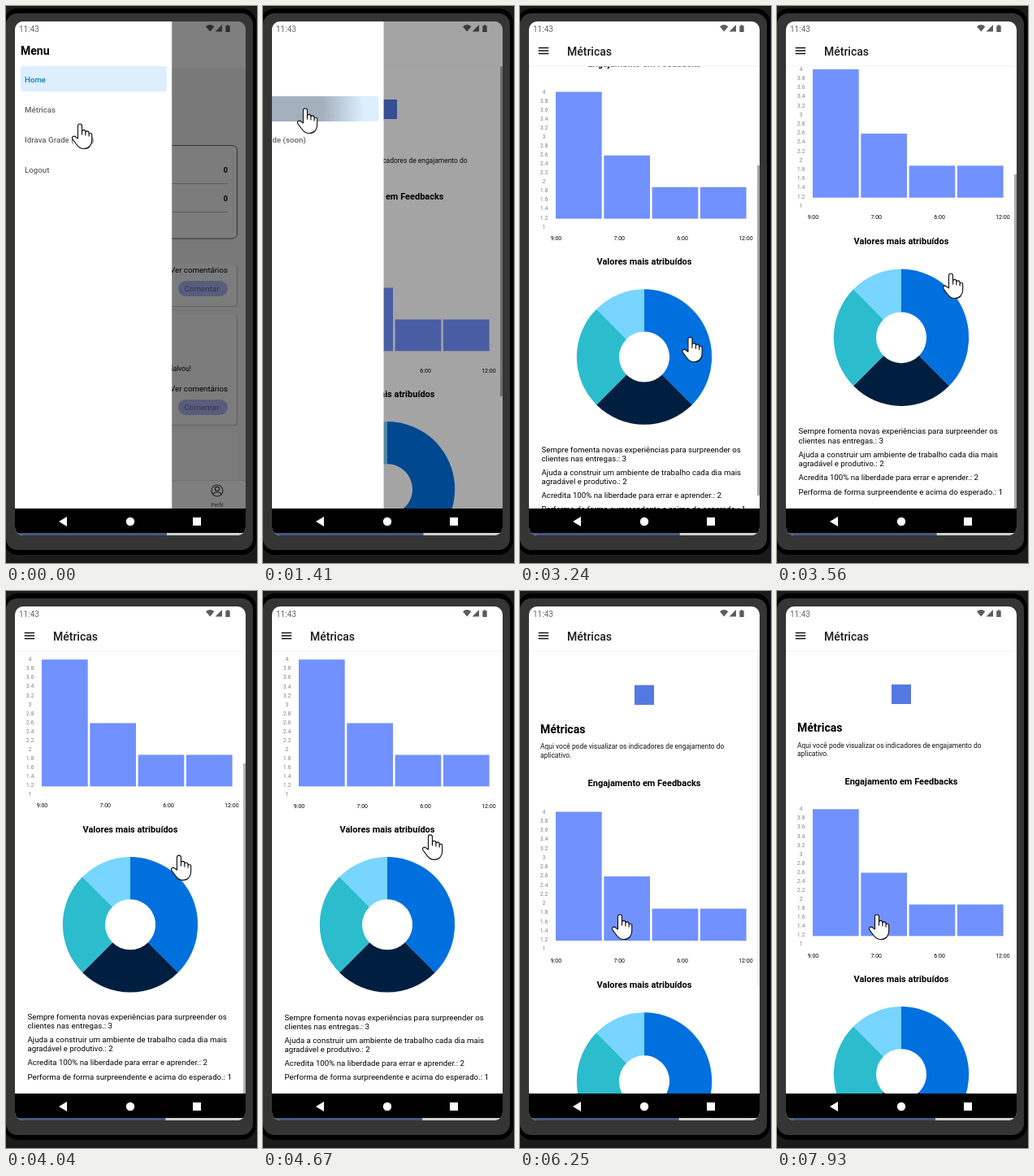
These frames come from a looping animation (309 px wide and 685 px high, 8000 ms). An HTML page:

```html
<!DOCTYPE html>
<html lang="pt">
<meta charset="utf-8">
<title>Métricas</title>
<style>
  html, body { margin: 0; width: 100%; height: 100%; overflow: hidden; background: #1b1b1b; }
  svg { display: block; font-family: Roboto, sans-serif; }
  .mid { text-anchor: middle; }
  .end { text-anchor: end; }
  .bold { font-weight: 700; }
  .item { font-weight: 500; font-size: 9.7px; fill: #666; }
  .list { font-size: 9.7px; }
  .axis { font-size: 7px; text-anchor: middle; }
</style>
<svg width="309" height="685" viewBox="0 0 309 685">
  <defs>
    <clipPath id="screenClip"><rect x="11" y="19" width="284" height="632" rx="10"/></clipPath>
    <clipPath id="pageClip"><rect x="11" y="74" width="285" height="544"/></clipPath>
    <radialGradient id="ripple" gradientUnits="userSpaceOnUse" cx="52" cy="127" r="1">
      <stop offset=".6" stop-opacity=".26"/><stop offset="1" stop-opacity="0"/>
    </radialGradient>
  </defs>

  <rect x="-3" y="3" width="311" height="672" rx="18"/>
  <rect x="0" y="9" width="304" height="660" rx="14" fill="#353535"/>

  <g clip-path="url(#screenClip)">
    <rect x="11" y="19" width="285" height="632" fill="#fff"/>

    <g id="home">
      <rect x="11" y="76" width="285" height="542" fill="#f4f4f4"/>
      <rect x="24" y="171.500" width="260.500" height="114.500" rx="6" fill="#fafafa" stroke="#444" stroke-width=".8"/>
      <path d="M36 218.500H273M36 253.500H273" stroke="#bbb"/>
      <g class="bold end" font-size="9"><text x="273" y="204.500">0</text><text x="273" y="239.500">0</text></g>
      <g id="posts"></g>
      <text class="end" x="228" y="449" font-size="8.450">Salvou!</text>
      <rect x="22" y="525" width="263" height="70" rx="4" fill="#fafafa"/>
      <rect x="11" y="583.500" width="285" height="35" fill="#fff" stroke="#ddd" stroke-width=".7"/>
      <g fill="none" stroke="#444" stroke-width="1.200">
        <circle cx="260" cy="596" r="7"/><circle cx="260" cy="594" r="2.600"/><path d="M255 601c1-4 9-4 10 0"/>
      </g>
      <text class="mid" x="260" y="615.500" font-size="6.700" fill="#555">Perfil</text>
    </g>

    <g id="metrics">
      <g clip-path="url(#pageClip)">
        <g id="stretch">
          <g id="scroller">
            <rect x="141" y="115" width="24" height="24" fill="#5479e2"/>
            <text class="bold" x="25" y="173" font-size="14">Métricas</text>
            <g font-size="8.450" fill="#111">
              <text x="25" y="192.500">Aqui você pode visualizar os indicadores de engajamento do</text>
              <text x="25" y="202.500">aplicativo.</text>
            </g>
            <g class="bold mid" font-size="11">
              <text x="153" y="237.500">Engajamento em Feedbacks</text>
              <text x="153" y="481">Valores mais atribuídos</text>
            </g>
            <g id="chart"></g>
            <g id="donut"></g>
            <g class="list" id="list"></g>
          </g>
          <rect id="bar" x="292" y="74" width="3.500" height="406" fill="#aaa"/>
        </g>
      </g>
      <rect x="11" y="73.500" width="285" height="1" fill="#f2f2f2"/>
      <path d="M22.700 51.500h12.500M22.700 55h12.500M22.700 58.500h12.500" stroke="#111" stroke-width="1.300"/>
      <text x="58" y="60.500" font-size="14" font-weight="500" fill="#1c1c1e">Métricas</text>
    </g>

    <path fill="#5c5c5c" d="M246 25.200Q251.200 20.800 256.400 25.200L251.200 31.500ZM257.500 31.500H266V23ZM270.300 24.200h1.700v-1h2v1h1.700v7.800h-5.400z"/>
    <rect id="shade" x="11" y="19" width="285" height="599"/>

    <g id="drawer">
      <rect x="11" y="19" width="193.200" height="599" fill="#fff"/>
      <text class="bold" x="18" y="60" font-size="14">Menu</text>
      <rect id="active" x="18" width="180" height="31" rx="2.500" fill="#dceeff"/>
      <rect id="press" x="18" y="111" width="180" height="31" rx="2.500" fill="url(#ripple)"/>
      <g class="item">
        <text id="homeItem" x="23" y="93.500">Home</text>
        <text id="metricsItem" x="23" y="130.500">Métricas</text>
        <text x="23" y="167.500">Idrava Grade (soon)</text>
        <text x="23" y="204.500">Logout</text>
      </g>
    </g>
    <text x="16" y="31.500" font-size="10" fill="#666">11:43</text>

    <rect x="11" y="618" width="285" height="30.500"/>
    <path d="M75 628v12l-10-6zM230 629h10v10h-10z" fill="#fff"/>
    <circle cx="153" cy="634" r="5.200" fill="#fff"/>
    <rect x="11" y="648" width="285" height="3" fill="#cfcfcf"/>
    <rect id="strip" x="11" y="648" height="3" fill="#44597c"/>
  </g>

  <path id="cursor" fill="#fff" stroke="#111" stroke-width="1.150" stroke-linejoin="round"
    d="M-2.500 18V2.500a2.500 2.500 0 0 1 5 0V13V9.500a2.200 2.200 0 0 1 4.400 0V14V11a2.100 2.100 0 0 1 4.200 0V15V12.500a1.900 1.900 0 0 1 3.600 0V20C14.700 26 11 30.500 5 30.500C0 30.500-2 28.500-4 25.500L-9 18.800C-11 16-7 14-5.300 16Z"/>
</svg>
<script>
const $ = id => document.getElementById(id);
const set = (id, name, value) => $(id).setAttribute(name, value);

$('posts').innerHTML = [[317, 369], [380, 515]].map(([top, bottom]) => `
  <rect x="22" y="${top}" width="263" height="${bottom - top + 1}" rx="4" fill="#c4c4c4"/>
  <rect x="22" y="${top}" width="262" height="${bottom - top}" rx="4" fill="#fafafa"/>
  <text class="end list" x="273" y="${bottom - 41.5}">Ver comentários</text>
  <rect x="212" y="${bottom - 31}" width="61" height="19" rx="9.500" fill="#b0bcf8"/>
  <text class="mid" x="241" y="${bottom - 18}" font-size="9.800" fill="#5d6a9e">Comentar</text>`).join('');

const barTops = [268.3, 346.5, 385.5, 385.5];
const hours = ['9:00', '7:00', '6:00', '12:00'];
$('chart').innerHTML =
  barTops.map((y, i) => `<rect x="${44 + i * 59.3}" y="${y}" width="56.700" height="${424.3 - y}" fill="#7191ff"/>`).join('') +
  hours.map((h, i) => `<text class="axis" x="${44.5 + i * 77.8}" y="450.500">${h}</text>`).join('') +
  Array.from({ length: 16 }, (_, i) =>
    `<text class="axis" fill="#858585" x="29.500" y="${270.3 + i * 11.07}">${+(4 - i * .2).toFixed(1)}</text>`).join('');

function slice(from, to, color) {
  const point = (r, eighth) => {
    const a = eighth * Math.PI / 4;
    return `${153 + r * Math.sin(a)} ${594.3 - r * Math.cos(a)}`;
  };
  return `<path fill="${color}" d="M${point(83.2, from)}A83.2 83.2 0 0 1 ${point(83.2, to)}` +
    `L${point(31, to)}A31 31 0 0 0 ${point(31, from)}Z"/>`;
}
$('donut').innerHTML = slice(0, 3, '#0070df') + slice(3, 5, '#001f40') + slice(5, 7, '#2bbdce') + slice(7, 8, '#77d5ff');

$('list').innerHTML = [
  [711.5, 'Sempre fomenta novas experiências para surpreender os'],
  [722.5, 'clientes nas entregas.: 3'],
  [739.5, 'Ajuda a construir um ambiente de trabalho cada dia mais'],
  [750.5, 'agradável e produtivo.: 2'],
  [767.5, 'Acredita 100% na liberdade para errar e aprender.: 2'],
  [784.8, 'Performa de forma surpreendente e acima do esperado.: 1'],
].map(([y, line]) => `<text x="26.500" y="${y}">${line}</text>`).join('');

// Keyframes: [time, value, ...], joined by a smooth curve without overshoot.
const cursorKeys = [[60, 91, 145], [280, 64, 164], [540, 52, 126], [1440, 52, 126], [2130, 165, 417],
  [2700, 200, 570], [2820, 200, 570], [3500, 214, 329], [3700, 214, 329], [4670, 206, 300],
  [5080, 140, 137], [5150, 140, 137], [5750, 123, 398], [6300, 123, 398]];
const barKeys = [[3980, 1], [4250, 0], [5150, 0], [5180, 1], [6030, 1], [6330, 0]];
const pressKeys = [[1420, 1], [1620, 0]];

const MAX_SCROLL = 184;
const drags = [{ down: 2820, up: 3640, from: 0 }, { down: 5150, up: 6260, from: MAX_SCROLL }];

function at(keys, t) {
  const last = keys.length - 1;
  if (t <= keys[0][0]) return keys[0].slice(1);
  if (t >= keys[last][0]) return keys[last].slice(1);
  const n = keys.findIndex(k => k[0] > t) - 1;
  const span = keys[n + 1][0] - keys[n][0], u = (t - keys[n][0]) / span;
  return keys[n].slice(1).map((a, c) => {
    const rate = i => (keys[i + 1][c + 1] - keys[i][c + 1]) / (keys[i + 1][0] - keys[i][0]);
    const tangent = i => {
      if (i === 0 || i === last) return 0;
      const p = rate(i - 1), q = rate(i);
      return p * q > 0 ? 2 * p * q / (p + q) : 0;
    };
    const b = keys[n + 1][c + 1], v = 1 - u;
    return a * v * v * (1 + 2 * u) + b * u * u * (3 - 2 * u) + span * u * v * (v * tangent(n) - u * tangent(n + 1));
  });
}

// Critically damped spring from 1 to 0, time in ms.
function spring(t, frequency) {
  const k = Math.max(0, t) * frequency / 1000;
  return (1 + k) * Math.exp(-k);
}

// The page follows the finger; beyond its ends it stretches.
function scrollAt(t) {
  const drag = drags.filter(d => d.down <= t).pop();
  if (!drag) return { scroll: 0, pull: 0 };
  const fingerY = time => at(cursorKeys, time)[1];
  const raw = drag.from + fingerY(drag.down) - fingerY(Math.min(t, drag.up));
  const scroll = Math.min(MAX_SCROLL, Math.max(0, raw));
  return { scroll, pull: (raw - scroll) * .000214 * spring(t - drag.up, 20) };
}

function draw(t) {
  const onMetrics = t >= 1290;
  set('home', 'visibility', onMetrics ? 'hidden' : 'visible');
  set('metrics', 'visibility', onMetrics ? 'visible' : 'hidden');

  const open = spring(t - 1353, 18.3);
  set('drawer', 'transform', `translate(${-194 * (1 - open)} 0)`);
  set('shade', 'opacity', open / 2);
  set('active', 'y', onMetrics ? 111 : 74);
  $('homeItem').style.fill = onMetrics ? '' : '#0a7cbd';
  $('metricsItem').style.fill = onMetrics ? '#0a7cbd' : '';
  set('ripple', 'r', Math.max(.01, (t - 1100) * .41));
  set('press', 'opacity', t < 1100 ? 0 : at(pressKeys, t)[0]);

  const { scroll, pull } = scrollAt(t);
  const scale = 1 + Math.abs(pull), pivot = pull > 0 ? 618 : 74;
  set('stretch', 'transform', `translate(0 ${pivot * (1 - scale)}) scale(1 ${scale})`);
  set('scroller', 'transform', `translate(0 ${-scroll})`);
  set('bar', 'y', 74 + scroll * 138 / MAX_SCROLL);
  set('bar', 'opacity', at(barKeys, t)[0]);

  set('strip', 'width', 187 - 3 * t / 8000);
  set('cursor', 'transform', `translate(${at(cursorKeys, t)})`);
}

const start = performance.now();
function tick() {
  draw((performance.now() - start) % 8000);
  requestAnimationFrame(tick);
}
tick();
</script>
</html>
```
